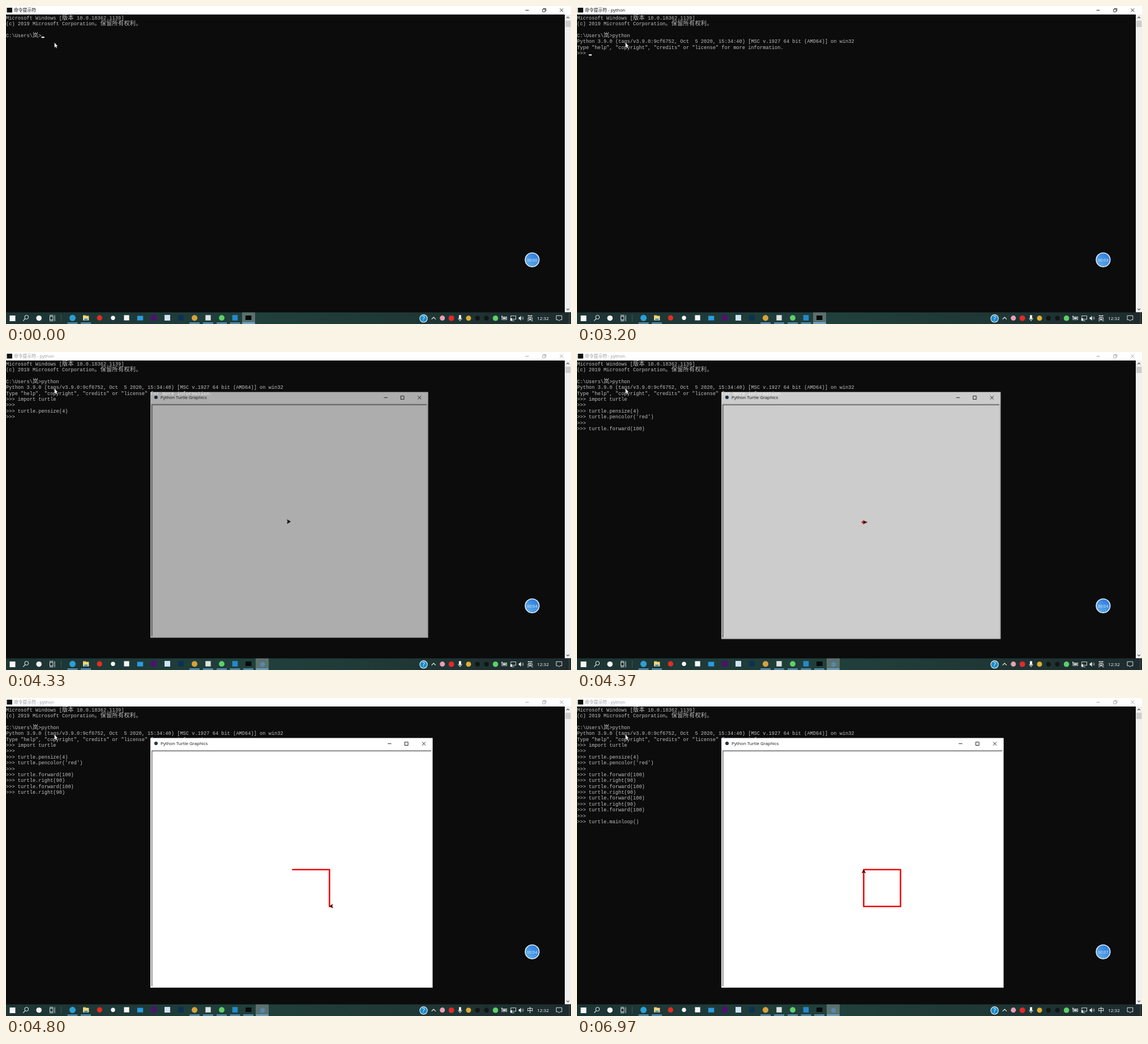
An HTML page with a canvas for the animation above (7030 ms loop, 998x561 px).

```html
<!DOCTYPE html>
<html lang="zh">
<head>
<meta charset="utf-8">
<title>Console</title>
<style>
html, body { margin: 0; width: 100%; height: 100%; overflow: hidden; background: #0c0c0c; }
canvas { display: block; }
</style>
</head>
<body>
<canvas id="stage" width="998" height="561"></canvas>
<script>
const stage = document.getElementById('stage').getContext('2d');
const layer = document.createElement('canvas').getContext('2d');
layer.canvas.width = 998;
layer.canvas.height = 561;
let ctx = stage;

const LOOP = 7030;
const CELL = 5.21, ROW = 10.39;
const MONO = '8.67px "Liberation Mono", "Noto Sans Mono", monospace';
const CJK = '10px "Noto Sans CJK SC", "Noto Sans CJK", sans-serif';
const UI = '"Open Sans", "Noto Sans", "Noto Sans CJK SC", sans-serif';

const OPEN = 4246, MOVE = 95, TURN = 130;
const SIDE = 65, HOME = { x: 506.4, y: 302.8 };

// ---- drawing helpers ----
function rect(x, y, w, h, color) {
  ctx.fillStyle = color;
  ctx.fillRect(x, y, w, h);
}

function disc(x, y, r, color) {
  ctx.fillStyle = color;
  ctx.beginPath();
  ctx.arc(x, y, r, 0, Math.PI * 2);
  ctx.fill();
}

function ring(x, y, r, color, width = 1) {
  ctx.strokeStyle = color;
  ctx.lineWidth = width;
  ctx.beginPath();
  ctx.arc(x, y, r, 0, Math.PI * 2);
  ctx.stroke();
}

function box(x, y, w, h, color, width = 0.9) {
  ctx.strokeStyle = color;
  ctx.lineWidth = width;
  ctx.strokeRect(x, y, w, h);
}

function path(points, color, width = 1) {
  ctx.strokeStyle = color;
  ctx.lineWidth = width;
  ctx.beginPath();
  points.forEach(([x, y], i) => i ? ctx.lineTo(x, y) : ctx.moveTo(x, y));
  ctx.stroke();
}

function shape(points, color) {
  ctx.fillStyle = color;
  ctx.beginPath();
  points.forEach(([x, y]) => ctx.lineTo(x, y));
  ctx.closePath();
  ctx.fill();
}

function label(text, x, y, size, color, align = 'left') {
  ctx.font = `${size}px ${UI}`;
  ctx.fillStyle = color;
  ctx.textAlign = align;
  ctx.textBaseline = 'alphabetic';
  ctx.fillText(text, x, y);
}

function chevron(x, y, r, angle, color, width = 1.1) {
  ctx.save();
  ctx.translate(x, y);
  ctx.rotate(angle);
  path([[-r, r / 2], [0, -r / 2], [r, r / 2]], color, width);
  ctx.restore();
}

function cross(x, y, r, color) {
  path([[x - r, y - r], [x + r, y + r]], color, 0.9);
  path([[x + r, y - r], [x - r, y + r]], color, 0.9);
}

// ---- console ----
const wide = ch => ch.charCodeAt(0) > 0x2e80;

// Places one character per cell, returns the end x.
function cells(text, row) {
  let x = 0;
  const y = 23.6 + row * ROW;
  ctx.textAlign = 'left';
  ctx.textBaseline = 'alphabetic';
  ctx.fillStyle = '#c0c0c0';
  for (const ch of text) {
    ctx.font = wide(ch) ? CJK : MONO;
    ctx.fillText(ch, x, y + (wide(ch) ? 0.5 : 0));
    x += wide(ch) ? CELL * 2 : CELL;
  }
  return x;
}

const KEYS = [640, 1300, 1680, 1780, 1870, 2100];
const START = 4360;
const STEPS = [];
{
  let at = START;
  for (let i = 0; i < 7; i++) {
    const turn = i % 2 === 1;
    const length = turn ? TURN : MOVE;
    STEPS.push({ turn, at, length, code: turn ? 'right(90)' : 'forward(100)' });
    at += length;
  }
  STEPS.end = at;
}

const SCRIPT = [
  [2670, 'Python 3.9.0 (tags/v3.9.0:9cf6752, Oct  5 2020, 15:34:40) [MSC v.1927 64 bit (AMD64)] on win32'],
  [2670, 'Type "help", "copyright", "credits" or "license" for more information.'],
  [2670, '>>> ', 3300, 'import turtle'],
  [3880, '>>> '],
  [3880, '>>> turtle.pensize(4)'],
  [4320, '>>> ', START, "turtle.pencolor('red')"],
  [START, '>>> '],
  ...STEPS.map(s => [s.at, '>>> turtle.' + s.code]),
  [STEPS.end, '>>> '],
  [STEPS.end, '>>> turtle.mainloop()']
];

function drawConsole(t) {
  const active = t < OPEN;
  rect(0, 0, 998, 561, '#0c0c0c');
  rect(0, 0, 998, 15, '#ffffff');
  rect(1.5, 3, 9.5, 8.5, '#111111');
  const ink = active ? '#111111' : '#999999';
  label('命令提示符' + (t >= 2600 ? ' - python' : ''), 14, 10.2, 7.8, ink);
  path([[917.5, 7.5], [923.5, 7.5]], ink, 0.9);
  box(947.8, 5.8, 4.4, 4.4, ink, 0.8);
  path([[949.3, 5.5], [949.3, 4.4], [953.8, 4.4], [953.8, 8.7], [952.5, 8.7]], ink, 0.8);
  cross(981.3, 7.4, 2.9, ink);

  rect(987, 15, 11, 525.5, '#f0f0f0');
  rect(988, 26, 9.3, 11, '#cdcdcd');
  chevron(992.5, 20.5, 2.4, 0, '#505050');
  chevron(992.5, 535, 2.4, Math.PI, '#505050');

  cells('Microsoft Windows [版本 10.0.18362.1139]', 0);
  cells('(c) 2019 Microsoft Corporation。保留所有权利。', 1);
  const typed = KEYS.filter(k => t >= k).length;
  let row = 3;
  let end = cells('C:\\Users\\岚>' + 'python'.slice(0, typed), row);
  if (t >= 2600 && t < 2670) { row = 4; end = 0; }
  SCRIPT.forEach(([at, text, later, rest], i) => {
    if (t < at) return;
    row = 4 + i;
    end = cells(text + (later && t >= later ? rest : ''), row);
  });
  if (active) rect(end, 22.9 + row * ROW, 5.2, 2.2, '#f2f2f2');
}

// ---- turtle window ----
function turtleState(t) {
  const s = { x: HOME.x, y: HOME.y, turn: 0, trail: [[HOME.x, HOME.y]] };
  for (const step of STEPS) {
    if (t < step.at) break;
    const p = Math.min(1, (t - step.at) / step.length);
    if (step.turn) {
      s.turn += p;
    } else {
      const a = Math.round(s.turn) * Math.PI / 2;
      s.x += Math.cos(a) * SIDE * p;
      s.y += Math.sin(a) * SIDE * p;
      s.trail.push([s.x, s.y]);
    }
  }
  return s;
}

function drawTurtle(t) {
  const s = turtleState(t);
  ctx.lineCap = ctx.lineJoin = 'round';
  if (s.trail.length > 1) path(s.trail, '#f00808', 2.6);
  ctx.lineCap = 'butt';
  ctx.lineJoin = 'miter';
  ctx.save();
  ctx.translate(s.x, s.y);
  ctx.rotate(s.turn * Math.PI / 2);
  const k = 0.65;
  const arrow = [[0, 0], [-9 * k, 5 * k], [-7 * k, 0], [-9 * k, -5 * k]];
  shape(arrow, '#000000');
  path([...arrow, arrow[0], arrow[1]], t >= START ? '#a01010' : '#000000', 0.7);
  ctx.restore();
}

function drawSmallWindow() {
  rect(90.5, 85.5, 75, 64.5, '#f0f0f0');
  rect(155, 116, 10, 11, '#c4c4c4');
  rect(116, 139, 11, 10, '#c4c4c4');
  path([[92, 95.5], [96, 95.5]], '#000', 1);
  disc(100, 95, 3, '#000');
  box(118.5, 92.5, 5.5, 5.5, '#000', 1);
  cross(151, 95.5, 3, '#000');
  path([[151, 107.3], [93.3, 107.3], [93.3, 135]], '#000', 1.2);
  const r = Math.PI / 2;
  [[160, 111, 0], [148, 144, 1], [160, 132, 2], [96, 144, 3]]
    .forEach(([x, y, q]) => chevron(x, y, 2.5, q * r, '#000', 1.4));
}

function drawBigWindow(t) {
  rect(255, 70.5, 498.6, 440.6, '#f0f0f0');
  rect(255.5, 71, 497.6, 20, '#ffffff');
  rect(257, 92.6, 494.2, 416.2, '#ffffff');
  path([[751, 93.4], [257.8, 93.4], [257.8, 508.6]], '#55555a', 1.2);
  disc(265, 80, 3.1, '#27364a');
  label('Python Turtle Graphics', 273, 83.2, 7.85, '#111111');
  path([[674.3, 80.6], [680.6, 80.6]], '#111', 0.9);
  box(704.4, 77.8, 5.7, 5.7, '#111');
  cross(738, 80.6, 3.1, '#111');
  drawTurtle(t);
}

// The window is painted opaque on a layer, then faded and scaled in as one.
function drawWindow(t) {
  if (t < OPEN) return;
  ctx = layer;
  ctx.clearRect(0, 0, 998, 561);
  const small = t < 4300;
  if (small) drawSmallWindow();
  else drawBigWindow(t);
  ctx = stage;

  const done = t > 4600;
  ctx.save();
  ctx.globalAlpha = done ? 1 : Math.max(0, 1 - 0.7 * 2 ** ((4270 - t) / 58));
  if (!small && !done) {
    const scale = 1 - 0.016 * 2 ** ((4330 - t) / 70);
    ctx.translate(255, 70.5);
    ctx.scale(scale, scale);
    ctx.translate(-255, -70.5);
  }
  ctx.drawImage(layer.canvas, 0, 0);
  ctx.restore();
}

// ---- overlays ----
function drawPointer() {
  const p = [[85.6, 64.6], [85.6, 73.4], [87.6, 71.6], [88.9, 74.6], [90.2, 74], [88.9, 71.1], [91.4, 70.9]];
  shape(p, '#ffffff');
  path([...p, p[0]], 'rgba(0,0,0,0.6)', 0.4);
}

function drawBadge(t) {
  const fill = ctx.createLinearGradient(920, 458, 938, 438);
  fill.addColorStop(0, '#62aee6');
  fill.addColorStop(1, '#2b7be0');
  disc(929.4, 447.8, 13.1, '#e4edf4');
  disc(929.4, 447.8, 11.5, fill);
  const sec = Math.floor((t + 30) / 1000);
  label('00:0' + sec, 929.4, 450.5, 7.2, '#d9ecfb', 'center');
}

const square = (x, color, r = 5) => rect(x - r, 550 - r, r * 2, r * 2, color);

function drawTaskbar(t) {
  const bg = ctx.createLinearGradient(0, 0, 998, 0);
  bg.addColorStop(0, '#1d3434');
  bg.addColorStop(0.45, '#20403c');
  bg.addColorStop(0.75, '#1f3634');
  bg.addColorStop(1, '#1e2b2e');
  rect(0, 540.5, 998, 20.5, bg);

  const opened = t >= OPEN, focused = t >= 4300;
  const glow = 'rgba(255,255,255,0.26)';
  if (!focused) rect(417, 540.5, 23, 20.5, glow);
  if (opened) rect(441, 540.5, 23, 20.5, focused ? glow : 'rgba(255,255,255,0.1)');
  [117.5, 141, 333, 357, 381, 404.5, 428].forEach(x => rect(x - 9, 558.6, 18, 1.6, '#76b9ed'));
  if (!focused) rect(417, 558.6, 23, 1.6, '#76b9ed');
  if (opened) rect(441.5, 558.6, 22, 1.6, '#76b9ed');

  const white = '#f4f6f6';
  rect(6.5, 546, 10, 10, white);
  ring(36.3, 549, 3.4, white);
  path([[33.9, 551.6], [30.3, 555.4]], white, 1.1);
  disc(58.2, 550.7, 4.8, white);
  box(77.4, 547.6, 5.6, 6, white);
  path([[76.9, 545.6], [83.5, 545.6]], white, 0.9);
  path([[76.9, 555.6], [83.5, 555.6]], white, 0.9);
  path([[86, 545.5], [86, 556]], white, 0.9);
  rect(97, 544, 0.8, 13, '#4a6260');

  disc(117.5, 550.3, 5.5, '#2c9fd6');
  rect(136, 545.4, 5, 3, '#e2aa35');
  rect(136, 546.6, 10.4, 8, '#f6d77a');
  rect(138.2, 551.5, 6, 3.1, '#3c92d0');
  disc(165.3, 550.2, 4.7, '#e42d20');
  disc(189, 550.2, 3.7, white);
  square(213, white, 4.6);
  rect(231.8, 546.6, 10.4, 8, '#2a9be0');
  square(261, '#4c126c');
  square(285, '#cfe2f2');
  square(309, '#0b3350');
  disc(333, 550.3, 5.1, '#d8a13c');
  square(357, '#dfe2e2', 4.7);
  disc(381, 550.2, 4.9, '#5fd068');
  square(404.5, '#2489ca', 4.8);
  rect(423, 546, 10.5, 8, '#0a0a0a');
  if (opened) disc(453.2, 551, 4.3, focused ? '#5c86a8' : '#4a5c62');

  disc(737.6, 551.3, 7.2, '#f0f4f6');
  disc(737.6, 551.3, 6.1, '#1b8bc9');
  label('?', 737.6, 555.4, 11, '#ffffff', 'center');
  chevron(755.3, 550.8, 3.6, 0, white);
  disc(770.8, 550.6, 4.5, '#e8a0b4');
  disc(786.7, 550.8, 4.9, '#e32a2c');
  rect(800, 545.4, 4, 6.6, white);
  path([[798.8, 550.5], [799.6, 553.2], [804.4, 553.2], [805.2, 550.5]], white, 0.8);
  rect(801.5, 553, 1, 3, white);
  disc(817, 550.8, 4.5, '#dfae35');
  disc(832.8, 550.8, 4.2, '#111516');
  disc(848.6, 550.8, 4.2, '#111516');
  disc(864.6, 550.8, 4.8, '#5fd068');
  box(876, 548.4, 8.6, 4.8, white, 0.8);
  rect(877.4, 549.7, 5.8, 2.2, white);
  path([[876, 546.2], [876, 549]], white, 1.3);
  box(891.8, 546.7, 8.8, 6, white, 0.8);
  path([[893, 555.3], [898, 555.3]], white, 0.8);
  rect(890.8, 551, 3.2, 4.3, white);
  shape([[905.6, 549.2], [907.2, 549.2], [909.6, 546.6], [909.6, 555], [907.2, 552.4], [905.6, 552.4]], white);
  ctx.strokeStyle = '#cfd6d6';
  ctx.lineWidth = 0.8;
  [2.3, 4.3].forEach(r => {
    ctx.beginPath();
    ctx.arc(909.6, 550.8, r, -0.8, 0.8);
    ctx.stroke();
  });
  label(t < 4480 ? '英' : '中', 925.7, 554.6, 11, '#ffffff', 'center');
  label('12:32', 948.5, 553.8, 8, '#ffffff', 'center');
  path([[972, 546.3], [981.8, 546.3], [981.8, 553.6], [978.6, 553.6], [976.9, 555.5],
    [975.2, 553.6], [972, 553.6], [972, 546.3]], white, 0.9);
  rect(994.6, 541, 0.7, 20, '#5a686a');
}

function draw(t) {
  drawConsole(t);
  drawWindow(t);
  drawTaskbar(t);
  drawBadge(t);
  drawPointer();
}

function tick() {
  draw(performance.now() % LOOP);
  requestAnimationFrame(tick);
}
tick();
</script>
</body>
</html>
```
